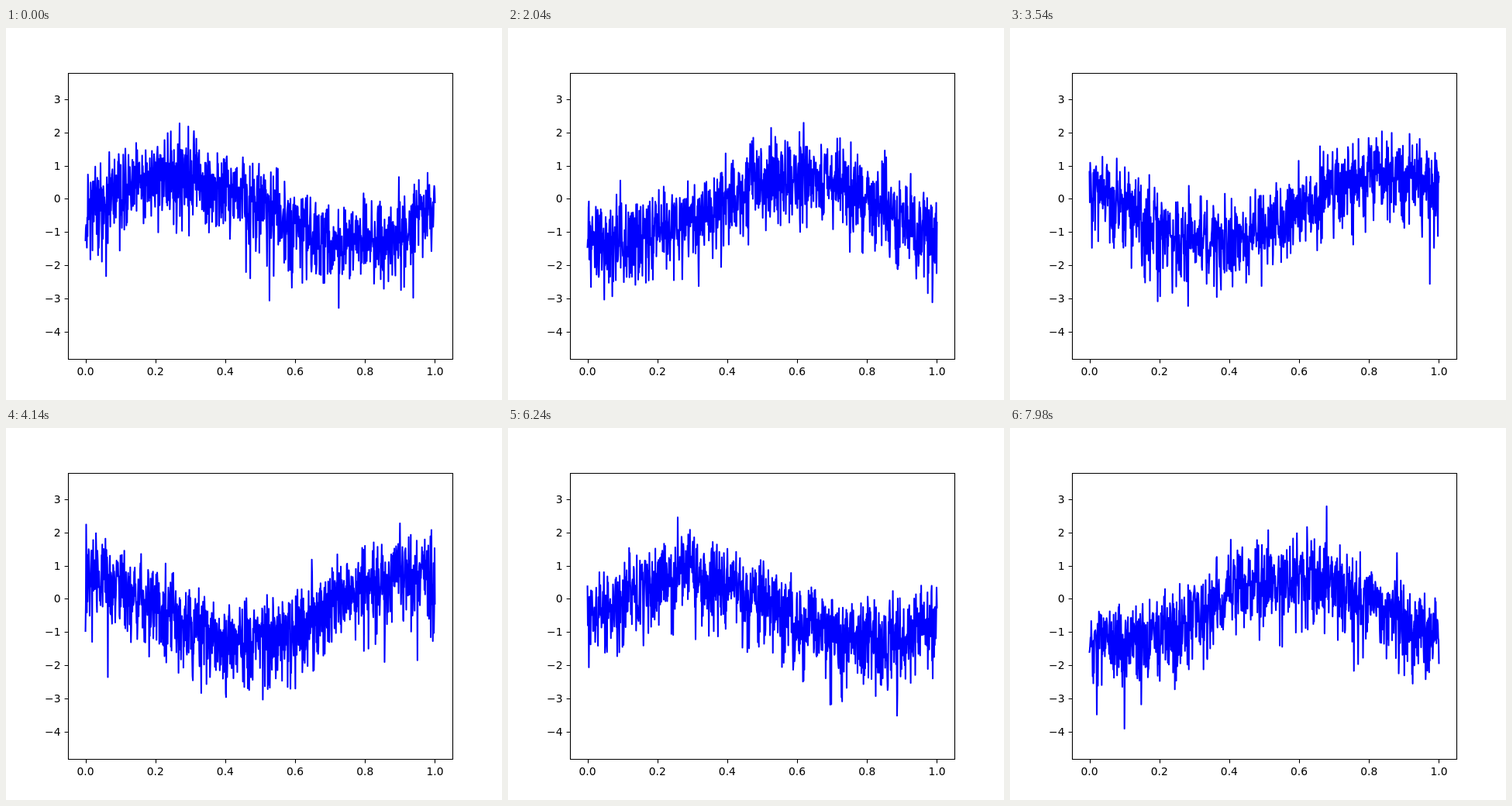
These frames come from a looping animation (640x480 px, 8000 ms). An HTML page:

```html
<!DOCTYPE html>
<html lang="en">
<head>
<meta charset="utf-8">
<title>Noisy travelling sine</title>
<style>
  html, body { margin: 0; width: 100%; height: 100%; overflow: hidden; background: #fff; }
  svg { display: block; width: 640px; height: 480px; }
  text { font: 13.89px "DejaVu Sans", sans-serif; fill: #000; }
  .axes { fill: none; stroke: #000; stroke-width: 1.11; }
  .wave { fill: none; stroke: #00f; stroke-width: 2.08; stroke-linejoin: round; stroke-linecap: square; }
</style>
</head>
<body>
<svg viewBox="0 0 640 480">
  <path class="wave" id="wave"/>
  <path class="axes" id="axes"/>
  <g id="labels"></g>
</svg>
<script>
const LOOP = 8000, STEP = 60, POINTS = 1000;
const OFFSET = -0.34, SPREAD = 0.68, SKEW = 0.06;
const wave = document.getElementById('wave');
const labels = document.getElementById('labels');

const toX = x => 102.55 + 450.91 * x;
const toY = y => 220.4 - 42.85 * y;

function addLabel(text, x, y, anchor) {
  const node = document.createElementNS('http://www.w3.org/2000/svg', 'text');
  node.textContent = text;
  node.setAttribute('x', x);
  node.setAttribute('y', y);
  node.setAttribute('text-anchor', anchor);
  labels.append(node);
}

function drawAxes() {
  let d = 'M80.5 58.5H576.5V427.5H80.5Z';
  for (let i = 0; i <= 5; i++) {
    const x = toX(i / 5);
    d += `M${Math.round(x) + 0.5} 427.5v4.9`;
    addLabel((i / 5).toFixed(1), x, 448, 'middle');
  }
  for (let v = -4; v <= 3; v++) {
    const y = Math.round(toY(v));
    d += `M80.5 ${y + 0.5}h-4.9`;
    addLabel(String(v).replace('-', '\u2212'), 70.5, y + 5, 'end');
  }
  document.getElementById('axes').setAttribute('d', d);
}

function randomFrom(seed) {
  return () => {
    seed = (seed + 0x6D2B79F5) | 0;
    let t = Math.imul(seed ^ (seed >>> 15), 1 | seed);
    t = (t + Math.imul(t ^ (t >>> 7), 61 | t)) ^ t;
    return ((t ^ (t >>> 14)) >>> 0) / 4294967296;
  };
}

// Gaussian noise with a slightly longer lower tail
function noise(random) {
  const g = Math.sqrt(-2 * Math.log(1 - random())) * Math.cos(2 * Math.PI * random());
  return SPREAD * (g - SKEW * (g * g - 1));
}

function drawWave(step) {
  const random = randomFrom(Math.imul(step + 1, 0x9E3779B1));
  const phase = 0.01 * (step + 1);
  const points = Array.from({ length: POINTS }, (_, i) => {
    const x = i / (POINTS - 1);
    const y = Math.sin(2 * Math.PI * (x - phase)) + OFFSET + noise(random);
    return `${toX(x).toFixed(2)} ${toY(y).toFixed(2)}`;
  });
  wave.setAttribute('d', 'M' + points.join('L'));
}

let shown = -1;
const start = performance.now();
function tick() {
  const time = Math.max(0, performance.now() - start) % LOOP;
  const step = Math.floor(time / STEP);
  if (step !== shown) drawWave(shown = step);
  requestAnimationFrame(tick);
}

drawAxes();
tick();
</script>
</body>
</html>
```
